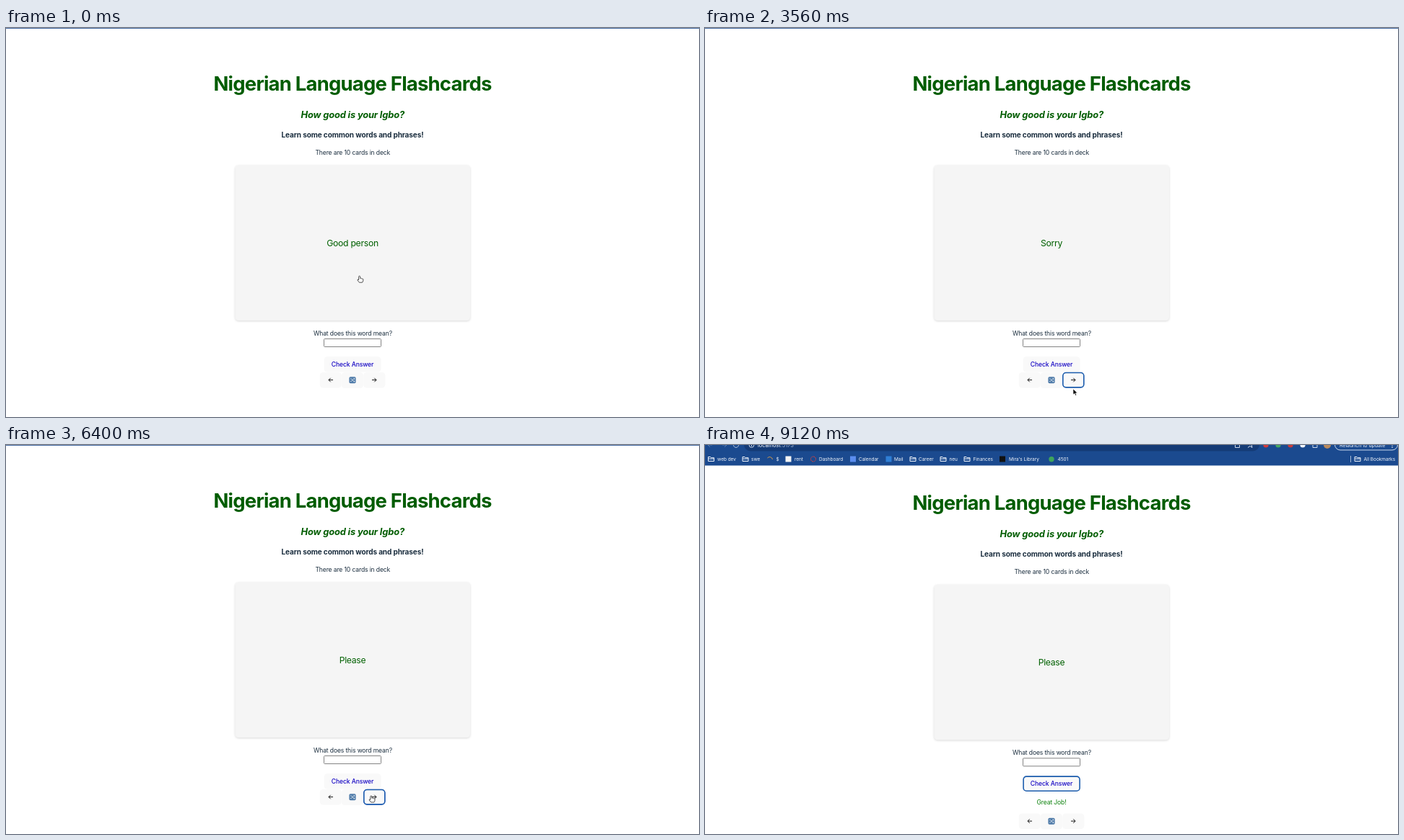
Recreate the animation shown at these times as an HTML page. Size 960 px wide and 540 px high, loop 9.52 s.

```html
<!DOCTYPE html>
<html lang="en">
<head>
<meta charset="utf-8">
<title>Flashcards</title>
<style>
  html, body { margin: 0; width: 100%; height: 100%; overflow: hidden; background: #fff; }
  svg { display: block; width: 960px; height: 540px; }
  text {
    font: 400 8.57px Inter, "Open Sans", sans-serif;
    font-optical-sizing: none;
    letter-spacing: -.015em;
    text-anchor: middle;
    white-space: pre;
    fill: #1a2d3e;
  }
  .title { font-size: 27.43px; font-weight: 700; letter-spacing: -.028em; fill: #005c00; }
  .sub { font-size: 12.86px; font-weight: 700; font-style: italic; letter-spacing: -.0115em; fill: #005c00; }
  .lead { font-size: 10.03px; font-weight: 700; letter-spacing: -.011em; }
  .word { font-size: 12.2px; letter-spacing: -.022em; fill: #006000; }
  .label { font-weight: 500; letter-spacing: -.012em; fill: #1607c4; }
  .answer { font: 7.14px "Liberation Sans", Arial, sans-serif; letter-spacing: 0; text-anchor: start; fill: #111; }
  .card { fill: #f5f5f5; filter: drop-shadow(0 1.3px 1.7px rgba(0, 0, 0, .15)); }
  .btn { fill: #f9f9f9; }
  .hover { fill: none; stroke: #7f86f0; stroke-width: 1; }
  .ring { fill: none; stroke: #1b5cad; stroke-width: 1.6; }
  .arrow { fill: none; stroke: #161616; stroke-width: 1; }
  #bar text { font-size: 6.5px; letter-spacing: -.005em; text-anchor: start; fill: #f2f6fc; }
  #bar .url { font-size: 7.5px; }
  #bar .pill { font-size: 7px; }
</style>
</head>
<body>
<svg viewBox="0 0 960 540">
  <g id="top">
    <text class="title" x="480" y="87.1">Nigerian Language Flashcards</text>
    <text class="sub" x="480.3" y="125.2">How good is your Igbo?</text>
    <text class="lead" x="480" y="152">Learn some common words and phrases!</text>
    <text x="480.3" y="176">There are 10 cards in deck</text>
    <rect class="card" x="317.5" y="190.5" width="325.5" height="215.5" rx="4.5"/>
    <text class="word" id="word" x="480" y="302.8"></text>
    <text x="480.4" y="426.5">What does this word mean?</text>
    <rect id="field" x="440.5" y="431.5" width="79" height="11" rx="1" fill="#fff"/>
    <text class="answer" id="answer" x="442.8" y="439.4"></text>
    <path id="caret" stroke="#222" stroke-width=".6"/>
    <g id="check"></g>
    <text class="label" x="480" y="470">Check Answer</text>
  </g>
  <text id="msg" x="480" y="480.8"></text>
  <g id="nav">
    <g id="prev"></g><g id="mix"></g><g id="next"></g>
    <path class="arrow" d="M453 488.6h-6m2.7-2.7l-2.7 2.7 2.7 2.7M507 488.6h6m-2.7-2.7l2.7 2.7-2.7 2.7"/>
    <rect x="475.4" y="484.2" width="9.2" height="9" rx="1.8" fill="#4f7ba9"/>
    <path d="M476.8 486.9h1.6l3 3.6h1.7M476.8 490.5h1.6l3-3.6h1.7m-1.2-1.1l1.2 1.1-1.2 1.1m0 1.4l1.2 1.2-1.2 1.1"
      fill="none" stroke="#fff" stroke-width=".7" opacity=".85"/>
  </g>
  <g id="bar">
    <rect y="-20" width="960" height="48.5" fill="#1b4a8f"/>
    <rect x="54" y="-12" width="714" height="20.5" rx="9" fill="#153b76"/>
    <g fill="none" stroke="#dfe8f5" stroke-width=".9">
      <path d="M10 0H4l3 3M24 0h6l-3 3" opacity=".35"/>
      <path d="M39.5-1a3.6 3.6 0 1 0 7 0M894.5 15v9" opacity=".8"/>
      <circle cx="64.5" cy="0" r="3.4"/><path d="M64.5-1v3"/>
      <path d="M734.5-1v4.5h6V-1M752 3.5l3-2 3 2-1-4M842-3v6.5h6V-3"/>
      <rect x="872.5" y="-8" width="87" height="15" rx="7.5"/>
    </g>
    <g id="tools"></g>
    <text class="url" x="73" y="2.8">localhost<tspan fill="#a9bddb">:5173</tspan></text>
    <text class="pill" x="879" y="2.6">Relaunch to update</text>
    <circle cx="952" cy="0" r=".8" fill="#fff"/><circle cx="952" cy="3" r=".8" fill="#fff"/>
    <g id="marks"></g>
  </g>
  <g id="cursor"><path id="pointer" stroke-linejoin="round"/></g>
</svg>
<script>
const LOOP = 9520;
const $ = id => document.getElementById(id);
const shift = (el, x, y) => el.setAttribute('transform', `translate(${x} ${y})`);

function add(parent, tag, attrs, text = '') {
  const el = document.createElementNS('http://www.w3.org/2000/svg', tag);
  for (const k in attrs) el.setAttribute(k, attrs[k]);
  el.textContent = text;
  parent.append(el);
  return el;
}

// Buttons: x, y, width, height in resting layout
const boxes = {
  check: [440.6, 456.3, 79, 21.2],
  prev: [434.8, 478, 30, 21.4],
  mix: [464.9, 478, 30, 21.9],
  next: [495.3, 478, 30, 21.4]
};
const buttons = Object.entries(boxes).map(([id, [x, y, width, height]]) => {
  const make = (cls, d) => add($(id), 'rect',
    { class: cls, x: x + d, y: y + d, width: width - 2 * d, height: height - 2 * d, rx: 4.3 });
  return { id, base: make('btn', 0), hover: make('hover', .35), ring: make('ring', .5) };
});

// Bookmarks: icon, icon centre, text start, label
const marks = [
  ['folder', 8.5, 17, 'web dev'], ['folder', 56, 64, 'swe'], ['arc', 90, 98.5, '$'],
  ['square #f4f4f4', 115.5, 124, 'rent'], ['ring', 150, 158, 'Dashboard'],
  ['square #5b8def', 205, 213, 'Calendar'], ['square #2f7fd6', 254.5, 262, 'Mail'],
  ['folder', 288, 296, 'Career'], ['folder', 330, 338.5, 'neu'], ['folder', 363, 371.5, 'Finances'],
  ['square #111', 412, 421, "Mira's Library"], ['dot #3fa45b', 480, 488.5, '4501'],
  ['folder', 904, 912.5, 'All Bookmarks']
];
for (const [icon, x, tx, label] of marks) {
  const [kind, fill] = icon.split(' ');
  const line = { fill: 'none', 'stroke-width': 1 };
  if (kind === 'folder')
    add($('marks'), 'path', { ...line, stroke: '#eef3fa', d: `M${x - 4} 22.5v-6h3l1 1.2h4v4.8zm0-3.4h8` });
  if (kind === 'square') add($('marks'), 'rect', { x: x - 4, y: 15.5, width: 8, height: 8, fill });
  if (kind === 'dot') add($('marks'), 'circle', { cx: x, cy: 19.7, r: 3.7, fill });
  if (kind === 'ring')
    add($('marks'), 'circle', { ...line, cx: x, cy: 19.5, r: 3.5, stroke: '#d8413c', 'stroke-dasharray': '2 .7' });
  if (kind === 'arc') add($('marks'), 'path', { ...line, stroke: '#d39a4a', d: `M${x - 3.5} 18a4 4 0 0 1 7 2` });
  add($('marks'), 'text', { x: tx, y: 21.9 }, label);
}
['#d23b3b', '#46a860', '#c93a3a', '#f0f4fa', '', '#b98a5e'].forEach((fill, i) => {
  if (fill) add($('tools'), 'circle', { cx: 777 + 17 * i, cy: 0, r: i === 5 ? 5 : 3.6, fill });
});

// Timed states
const words = [[0, 'Good person'], [3360, 'Sorry'], [4800, 'Thank you'], [5720, 'Please']];
const notes = [[0, ''], [2360, 'Great Job!'], [3360, ''], [7160, 'Try Again'], [8480, 'Great Job!']];
const focus = [[0, ''], [800, 'field'], [3360, 'next'], [3800, ''], [4800, 'next'],
  [7160, 'check'], [7740, 'field'], [8480, 'check']];
const at = (list, t) => list.filter(s => s[0] <= t).pop()[1];

const trail = [
  [0, 491, 344.5], [120, 491, 344.5], [560, 486, 418], [760, 480, 437], [1060, 480, 437],
  [2600, 480, 440], [2960, 498, 481], [3240, 510, 501], [3640, 510, 501],
  [4160, 448, 487], [4280, 465, 487], [4400, 468, 487], [4700, 508.5, 489], [6300, 508.5, 489],
  [7000, 486, 458], [7400, 486, 458], [7700, 474, 422], [7900, 474, 422],
  [8220, 474, 424], [8420, 486, 454], [8520, 486, 454], [8760, 560, -12], [LOOP, 560, -12]
];
const hidden = t => (t > 1080 && t < 2600) || (t > 7900 && t < 8220) || t > 8760;
const smooth = k => k * k * (3 - 2 * k);

function mouse(t) {
  const i = Math.max(1, trail.findIndex(p => p[0] > t));
  const [t0, x0, y0] = trail[i - 1], [t1, x1, y1] = trail[i];
  const k = smooth((t - t0) / (t1 - t0));
  return [x0 + (x1 - x0) * k, y0 + (y1 - y0) * k];
}

function layout(t) {
  const k = Math.min(1, Math.max(0, (t - 8700) / 420));
  const slide = 1 - (1 - k) ** 3;
  const gap = at(notes, t) ? 15.1 : 0;
  return { slide, top: 18.4 * slide - gap, nav: 18.4 * slide + gap };
}

const inside = ([px, py], [x, y, w, h], dy) => px >= x && px < x + w && py >= y + dy && py < y + dy + h;

function over(id, t) {
  const l = layout(t);
  return !hidden(t) && inside(mouse(t), boxes[id], id === 'check' ? l.top : l.nav);
}

// Border fade: share of the last 250 ms spent over the button
function glow(id, t) {
  let n = 0;
  for (let i = 0; i < 10; i++) n += over(id, Math.max(0, t - 25 * i));
  return n / 10;
}

function typed(t) {
  const keys = (start, step) => 1 + Math.floor((t - start) / step);
  if (t >= 1080 && t < 2360) {
    const n = t < 1920 ? Math.min(8, keys(1080, 90)) : 8 + Math.min(4, keys(1920, 65));
    return 'ezigbo mmadu'.slice(0, n);
  }
  return t >= 7880 && t < 8480 ? 'biko'.slice(0, keys(7880, 80)) : '';
}

const shapes = {
  hand: ['M-2.4.8a1 1 0 0 1 2 0v2.2q1-.6 1.6.3 1-.4 1.5.5 1.2-.2 1.2 1l-.5 2.6-.8 1.3h-4.2l-2.3-2.9q-.6-1.3.9-1.2l.6.6z',
    '#fff', '#222', .8],
  arrow: ['M0 0V8l1.9-1.7 1.3 2.9 1.3-.6-1.2-2.8h2.6z', '#000', '#fff', .6],
  beam: ['M-1.3-4q1.3 0 1.3 1v6q0 1-1.3 1M1.3-4Q0-4 0-3v6q0 1 1.3 1', 'none', '#333', .8]
};

function pointerKind(t, pos, l) {
  if (Object.keys(boxes).some(id => over(id, t)) || inside(pos, [317, 190, 326, 216], l.top)) return 'hand';
  const onText = inside(pos, [426, 418, 109, 25], l.top) || (at(notes, t) && inside(pos, [459, 472, 43, 12], 0));
  return onText ? 'beam' : 'arrow';
}

function setText(el, s) {
  if (el.textContent !== s) el.textContent = s;
}

function draw(t) {
  const l = layout(t), note = at(notes, t), active = at(focus, t);
  shift($('top'), 0, l.top);
  shift($('nav'), 0, l.nav);
  shift($('msg'), 0, 18.4 * l.slide);
  shift($('bar'), 0, 27.7 * (l.slide - 1));

  setText($('word'), at(words, t));
  setText($('msg'), note);
  $('msg').style.fill = note === 'Try Again' ? '#c00808' : '#0a800a';

  const typing = active === 'field';
  $('field').setAttribute('stroke', typing ? '#1b5cad' : '#767676');
  $('field').setAttribute('stroke-width', typing ? 1.5 : .9);
  setText($('answer'), typed(t));
  const end = 443.3 + (typed(t) ? $('answer').getComputedTextLength() : 1);
  $('caret').setAttribute('d', typing ? `M${end} 433.4v7.4` : '');

  for (const b of buttons) {
    b.hover.style.opacity = glow(b.id, t);
    b.ring.style.opacity = +(active === b.id);
  }

  const pos = mouse(t);
  const [d, fill, stroke, width] = shapes[pointerKind(t, pos, l)];
  const attrs = { d, fill, stroke, 'stroke-width': width };
  for (const k in attrs) $('pointer').setAttribute(k, attrs[k]);
  shift($('cursor'), ...pos);
  $('cursor').style.display = hidden(t) ? 'none' : '';
}

const start = performance.now();
function tick() {
  draw((performance.now() - start) % LOOP);
  requestAnimationFrame(tick);
}
tick();
</script>
</body>
</html>
```
